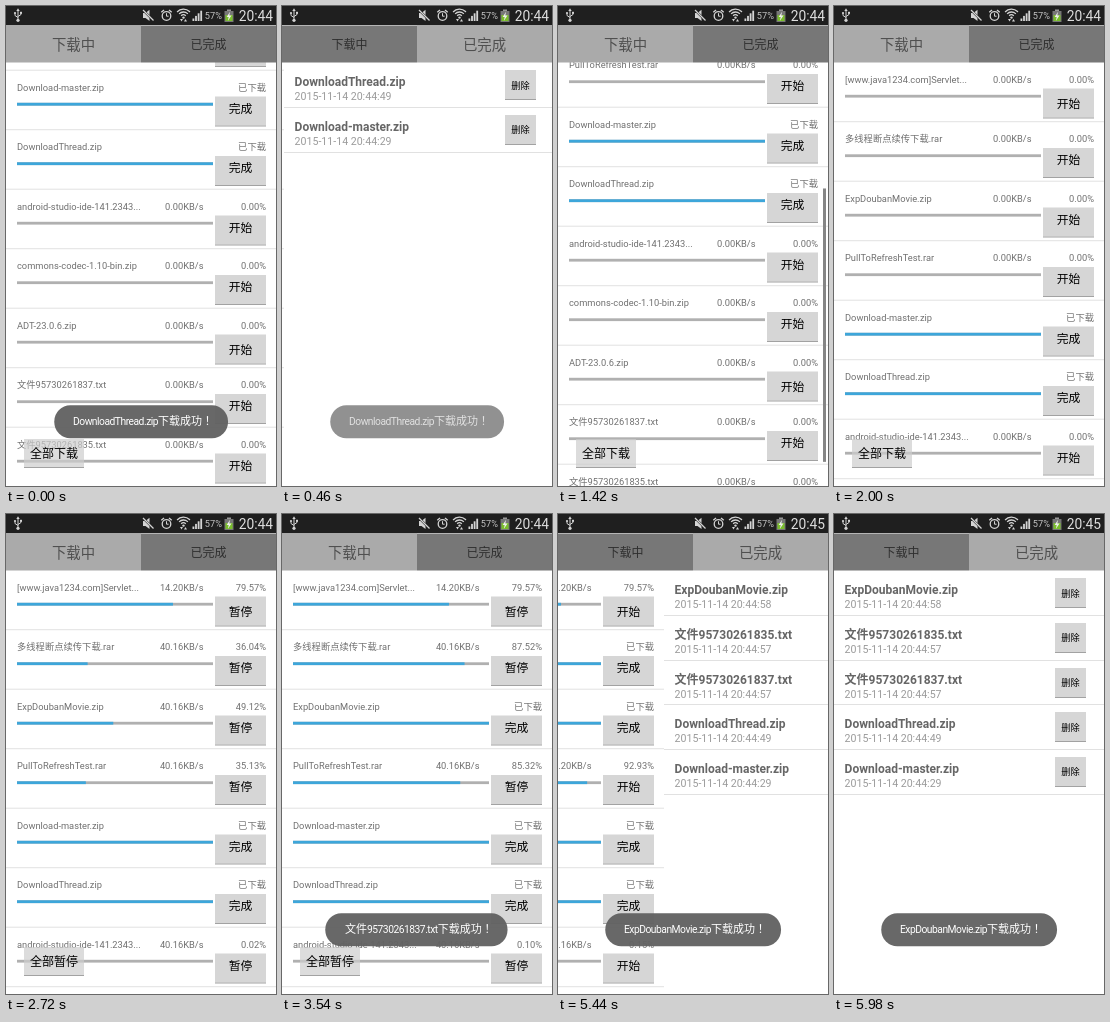
Recreate the animation shown at these times as an HTML page with a canvas. Size 270 px wide and 480 px high, loop 6000 ms.

```html
<!DOCTYPE html>
<html lang="zh-CN">
<head>
<meta charset="utf-8">
<title>下载</title>
<style>
html, body { margin: 0; width: 100%; height: 100%; overflow: hidden; background: #fff; }
canvas { display: block; width: 270px; height: 480px; }
</style>
</head>
<body>
<canvas id="stage"></canvas>
<script>
const W = 270, H = 480, LOOP = 6000;
const TOP = 56.3, PITCH = 59.5, DONE_PITCH = 44.7, MAX_SCROLL = 230;
const FONTS = 'Roboto, "Noto Sans CJK SC", "Noto Sans CJK", sans-serif';
const BLUE = '#3da6da';

const canvas = document.getElementById('stage');
const dpr = window.devicePixelRatio || 1;
canvas.width = W * dpr;
canvas.height = H * dpr;
const ctx = canvas.getContext('2d');

// progress: [time, percent] steps
const files = [
  { name: '[www.java1234.com]Servlet...', lowFrom: 0, steps: [[2160, 0], [2600, 79.57]] },
  { name: '多线程断点续传下载.rar', steps: [[2160, 0], [3540, 88.81], [3780, 100]] },
  { name: 'ExpDoubanMovie.zip', steps: [[2160, 0], [3300, 100]] },
  { name: 'PullToRefreshTest.rar', lowFrom: 3660, steps: [[2160, 0], [3540, 86.57], [3780, 92.93]] },
  { name: 'Download-master.zip', steps: [[0, 100]] },
  { name: 'DownloadThread.zip', steps: [[0, 100]] },
  { name: 'android-studio-ide-141.2343...', steps: [[2500, 0], [3540, 0.1], [3900, 0.15]] },
  { name: 'commons-codec-1.10-bin.zip', steps: [[0, 0]] },
  { name: 'ADT-23.0.6.zip', steps: [[0, 0]] },
  { name: '文件95730261837.txt', steps: [[2160, 0], [2700, 100]] },
  { name: '文件95730261835.txt', steps: [[2160, 0], [2750, 100]] }
];

const finished = [
  ['ExpDoubanMovie.zip', '58'],
  ['文件95730261835.txt', '57'],
  ['文件95730261837.txt', '57'],
  ['DownloadThread.zip', '49'],
  ['Download-master.zip', '29']
];

// fade-in and fade-out spans; equal ends make a hard cut
const toasts = [
  { file: 'DownloadThread.zip', x: 67, left: 48.3, right: 222, from: [-2, -1], to: [420, 570] },
  { file: '文件95730261837.txt', x: 63, left: 43.3, right: 225.5, from: [2760, 2860], to: [3880, 3880] },
  { file: '文件95730261835.txt', x: 63, left: 43.3, right: 225.5, from: [3880, 3880], to: [4790, 4900] },
  { file: 'ExpDoubanMovie.zip', x: 66, left: 47.3, right: 223, from: [4770, 4850], to: [6001, 6002] }
];

// finger drag, release, end of settling
const swipes = [
  { start: 0, release: 200, end: 600, to: 1 },
  { start: 645, release: 810, end: 1140, to: 0 },
  { start: 5020, release: 5380, end: 5980, to: 1 }
];

const clamp = v => Math.max(0, Math.min(1, v));
const span = (t, a, b) => a === b ? +(t >= a) : clamp((t - a) / (b - a));

function progress(steps, t) {
  let [t0, v0] = steps[0];
  for (const [t1, v1] of steps) {
    if (t < t1) return v0 + (v1 - v0) * span(t, t0, t1);
    [t0, v0] = [t1, v1];
  }
  return v0;
}

function pager(t) {
  let page = 0, tab = 0;
  for (const s of swipes) {
    if (t < s.start) break;
    const drag = 0.4 * span(t, s.start, s.release) ** 1.6;
    const settle = 0.6 * (1 - (1 - span(t, s.release, s.end)) ** 4);
    const p = drag + settle;
    page = s.to ? p : 1 - p;
    if (t >= s.release) tab = s.to;
  }
  return { page, tab };
}

function rect(x, y, w, h, fill) {
  ctx.fillStyle = fill;
  ctx.fillRect(x, y, w, h);
}

function text(str, x, cy, size, fill, align = 'left', weight = 400) {
  ctx.font = `${weight} ${size}px ${FONTS}`;
  ctx.textAlign = align;
  ctx.fillStyle = fill;
  ctx.fillText(str, x, cy + size * 0.36);
}

function line(points, color, width = 1) {
  ctx.beginPath();
  points.forEach(([x, y]) => ctx.lineTo(x, y));
  ctx.strokeStyle = color;
  ctx.lineWidth = width;
  ctx.stroke();
}

function fillPath(points, color) {
  ctx.beginPath();
  points.forEach(([x, y]) => ctx.lineTo(x, y));
  ctx.fillStyle = color;
  ctx.fill();
}

function arc(x, y, r, a, b, color, width) {
  ctx.beginPath();
  ctx.arc(x, y, r, a, b);
  ctx.strokeStyle = color;
  ctx.lineWidth = width;
  ctx.stroke();
}

function dot(x, y, r, color) {
  ctx.beginPath();
  ctx.arc(x, y, r, 0, Math.PI * 2);
  ctx.fillStyle = color;
  ctx.fill();
}

function button(label, x, y, w, h, size, cy, fill = '#d6d6d6') {
  rect(x, y, w, h - 1, fill);
  rect(x, y + h - 1, w, 1, '#a2a2a2');
  text(label, x + w / 2, cy, size, '#000', 'center', 500);
}

function statusBar(t) {
  const ink = '#d4d4d4', back = '#1f1f1f';
  rect(0, 0, W, 19, back);

  // usb
  line([[12, 4], [12, 14]], ink);
  line([[9, 7], [9, 9.5], [12, 11.5]], ink);
  line([[15, 6.5], [15, 8.5], [12, 10.5]], ink);
  fillPath([[10.3, 5], [12, 2.2], [13.7, 5]], ink);
  dot(12, 14.3, 1.6, ink);
  dot(9, 7, 1.1, ink);
  rect(14, 5.8, 2, 2, ink);

  // muted speaker
  fillPath([[137, 7], [139.5, 7], [143.5, 3.8], [143.5, 15], [139.5, 12], [137, 12]], ink);
  line([[136.5, 3.5], [148, 15]], back, 2.2);
  line([[137, 4], [147.5, 14.5]], ink, 1.2);

  // alarm clock
  arc(160.5, 10, 4.3, 0, Math.PI * 2, ink, 1.3);
  line([[160.5, 7.2], [160.5, 10.2], [162.6, 10.2]], ink);
  line([[155.3, 6.2], [158, 4]], ink, 1.4);
  line([[163, 4], [165.7, 6.2]], ink, 1.4);

  // wifi
  for (const r of [3.2, 6, 8.8]) arc(177.5, 12, r, -Math.PI * 0.76, -Math.PI * 0.24, ink, 1.3);
  dot(177.5, 11.6, 1.2, ink);
  fillPath([[174, 13], [177, 13], [175.5, 15.5]], ink);
  fillPath([[178, 15.5], [181, 15.5], [179.5, 13]], ink);

  // signal
  for (let i = 0; i < 4; i++) rect(186.5 + i * 2.6, 12.5 - i * 2.6, 1.8, 2.5 + i * 2.6, ink);

  text('57%', 198.8, 10, 9.2, '#c4c4c4');

  // battery
  rect(221, 3.5, 4, 2, '#999');
  rect(218.5, 5, 9, 11, '#777');
  rect(219.5, 9, 7, 6, '#79bd2b');
  fillPath([[224, 5.8], [220.7, 11], [222.7, 11], [221.8, 15], [225.5, 9.5], [223.3, 9.5]], '#eee');

  text(t < 3720 ? '20:44' : '20:45', 267, 9.7, 13.8, '#dedede', 'right');
}

function tabs(selected) {
  ['下载中', '已完成'].forEach((label, i) => {
    const on = i === selected, x = i * W / 2;
    rect(x, 19, W / 2, 37.5, on ? '#aaa' : '#777');
    if (!on) rect(x, 19, W / 2, 1, '#b5b5b5');
    text(label, x + 67.5, 38.5, on ? 14.4 : 12, on ? '#505050' : '#2f2f2f', 'center');
  });
}

function fileRow(file, i, y, t) {
  const running = t >= 2160 && t < 3780;
  const pct = progress(file.steps, Math.floor(t / 40) * 40);
  const done = pct >= 100, grey = '#707070';
  text(file.name, 11, y + 17, 9.3, grey);
  if (done) {
    text('已下载', 260, y + 17, 9.3, grey, 'right');
  } else {
    const slow = file.lowFrom !== undefined && t >= file.lowFrom;
    const speed = pct === 0 ? '0.00' : slow ? '14.20' : '40.16';
    text(speed + 'KB/s', 197.5, y + 17, 9.3, grey, 'right');
    text(pct.toFixed(2) + '%', 260, y + 17, 9.3, grey, 'right');
  }
  rect(11, y + 32.3, 196, 2.8, '#b0b0b0');
  if (pct > 0.5) rect(11, y + 32.3, 196 * pct / 100, 2.8, BLUE);
  const shift = i % 8 ? 0 : 3.5;
  button(done ? '完成' : running ? '暂停' : '开始', 209, y + 26, 51, 30, 11.8, y + 37.8 + shift);
  rect(0, y + 58.7, W, 1, '#e1e1e1');
}

function downloadPage(t) {
  const u = span(t, 1344, 1794);
  const scroll = MAX_SCROLL * (1 - u) ** 0.9 * (1 - 0.05 * u);
  files.forEach((file, i) => {
    const y = Math.round((TOP + i * PITCH - scroll) * 2) / 2;
    if (y > TOP - PITCH && y < H) fileRow(file, i, y, t);
  });
  const running = t >= 2160 && t < 3780;
  button(running ? '全部暂停' : '全部下载', 18, 433, 60, 29, 12, 447.3, 'rgba(206,206,206,.7)');

  const alpha = span(t, 1340, 1360) * (1 - span(t, 1880, 1980));
  if (alpha > 0) {
    const view = H - 57, total = files.length * PITCH;
    ctx.globalAlpha = alpha;
    rect(265, 58 + scroll / total * view, 3, view * view / total, '#858585');
    ctx.globalAlpha = 1;
  }
}

function finishedPage(t) {
  const list = t < 3300 ? finished.slice(3) : finished;
  list.forEach(([name, sec], i) => {
    const y = TOP + i * DONE_PITCH;
    text(name, 10.6, y + 19.7, 12, '#666', 'left', 700);
    text('2015-11-14 20:44:' + sec, 10.6, y + 34, 10.6, '#9b9b9b');
    button('删除', 221, Math.round(y + 8), 31, 30, 9.2, y + 23);
    rect(0, Math.round(y + 44.5), W, 1, '#e1e1e1');
  });
}

function toast({ file, x, left, right, from, to }, t) {
  const alpha = span(t, ...from) * (1 - span(t, ...to));
  if (!alpha) return;
  ctx.globalAlpha = alpha;
  ctx.beginPath();
  ctx.roundRect(left, 399.3, right - left, 33, 16);
  ctx.fillStyle = 'rgba(98,98,98,.96)';
  ctx.fill();
  for (const part of (file + '下载成功\u2005！').match(/[\x20-\x7e]+|[^\x20-\x7e]+/g)) {
    const latin = part.charCodeAt(0) < 128;
    ctx.letterSpacing = latin ? '-0.5px' : '0px';
    text(part, x, latin ? 415.4 : 415.2, latin ? 10.3 : 11, '#fff');
    x += ctx.measureText(part).width;
  }
  ctx.letterSpacing = '0px';
  ctx.globalAlpha = 1;
}

function draw(t) {
  const { page, tab } = pager(t);
  const shift = Math.round(page * W);
  ctx.setTransform(dpr, 0, 0, dpr, 0, 0);
  rect(0, 0, W, H, '#fff');
  [downloadPage, finishedPage].forEach((paint, i) => {
    const x = i * W - shift;
    if (Math.abs(x) >= W) return;
    ctx.save();
    ctx.translate(x, 0);
    ctx.beginPath();
    ctx.rect(0, 56, W, H - 56);
    ctx.clip();
    paint(t);
    ctx.restore();
  });
  tabs(tab);
  statusBar(t);
  toasts.forEach(item => toast(item, t));
}

const begin = performance.now();
function tick() {
  draw((performance.now() - begin) % LOOP);
  requestAnimationFrame(tick);
}
tick();
</script>
</body>
</html>
```
